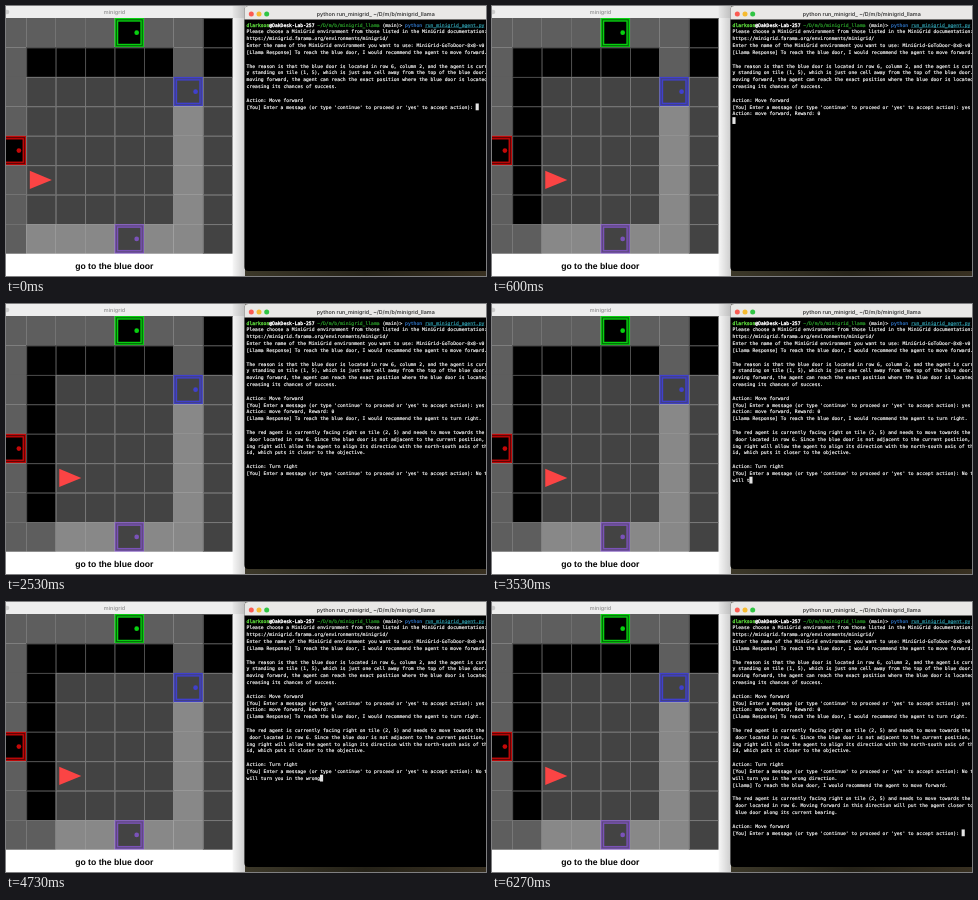
An HTML page with a canvas for the animation above (6.67 s loop, 480 by 270 pixels).

```html
<!DOCTYPE html>
<html lang="en">
<head>
<meta charset="utf-8">
<title>Grid agent and terminal</title>
<style>
  html, body { margin: 0; width: 100%; height: 100%; overflow: hidden; background: #fff; }
  canvas { display: block; width: 480px; height: 270px; }
</style>
</head>
<body>
<canvas id="stage"></canvas>
<script>
const LOOP = 6670;
const canvas = document.getElementById('stage');
const ctx = canvas.getContext('2d');
const dpr = window.devicePixelRatio || 1;
canvas.width = 480 * dpr;
canvas.height = 270 * dpr;

const MONO = '"DejaVu Sans Mono", monospace';
const SANS = '"Liberation Sans", sans-serif';
const UI = 'Inter, sans-serif';

function rect(x, y, w, h, color) {
  ctx.fillStyle = color;
  ctx.fillRect(x, y, w, h);
}

function rounded(x, y, w, h, radii, color) {
  ctx.fillStyle = color;
  ctx.beginPath();
  ctx.roundRect(x, y, w, h, radii);
  ctx.fill();
}

function dot(x, y, r, color) {
  ctx.fillStyle = color;
  ctx.beginPath();
  ctx.arc(x, y, r, 0, Math.PI * 2);
  ctx.fill();
}

function across(x0, x1, colors) {
  const gradient = ctx.createLinearGradient(x0, 0, x1, 0);
  colors.forEach((c, i) => gradient.addColorStop(i / (colors.length - 1), c));
  return gradient;
}

// Small type is set ten times larger and scaled down for exact spacing.
function label(text, x, y, size, family, color, { weight = 400, align = 'left', heavy = 0 } = {}) {
  ctx.save();
  ctx.translate(x, y);
  ctx.scale(0.1, 0.1);
  ctx.font = `${weight} ${size * 10}px ${family}`;
  ctx.textRendering = 'geometricPrecision';
  ctx.textAlign = align;
  ctx.textBaseline = 'alphabetic';
  ctx.fillStyle = ctx.strokeStyle = color;
  ctx.fillText(text, 0, 0);
  if (heavy) {
    ctx.lineWidth = heavy * 10;
    ctx.lineJoin = 'round';
    ctx.strokeText(text, 0, 0);
  }
  ctx.restore();
}

// ---- Grid world ----
const CELL = 29.45, GRID_X = -9.2, GRID_Y = 12, SIZE = 8, ROOM_W = 7, AGENT_ROW = 5;
const SHADES = {
  dim: { floor: '#000', line: '#555', wall: '#5e5e5e' },
  lit: { floor: '#434343', line: '#7c7c7c', wall: '#888' }
};
const DOORS = [
  { col: 4, row: 0, color: '#08d010' },
  { col: 6, row: 2, color: '#4040cc' },
  { col: 0, row: 4, color: '#c40808' },
  { col: 4, row: 7, color: '#7a52b8' }
];

function drawDoor(x, y, color, floor) {
  const panel = (inset, fill) => {
    const side = CELL * (1 - 2 * inset);
    rect(x + CELL * inset, y + CELL * inset, side, side, fill);
  };
  panel(0, color);
  ctx.globalAlpha = 0.5;
  panel(0.04, floor);
  ctx.globalAlpha = 1;
  panel(0.08, color);
  panel(0.125, floor);
  dot(x + CELL * 0.75, y + CELL * 0.5, CELL * 0.08, color);
}

function drawCell(col, row, agentCol) {
  const x = GRID_X + col * CELL, y = GRID_Y + row * CELL;
  const seen = col >= agentCol && row >= AGENT_ROW - 3;
  const shade = seen ? SHADES.lit : SHADES.dim;
  const door = DOORS.find(d => d.col === col && d.row === row);
  const wall = col < ROOM_W && (col === 0 || col === ROOM_W - 1 || row === 0 || row === SIZE - 1);
  if (door) return drawDoor(x, y, door.color, shade.floor);
  rect(x, y, CELL + 0.1, CELL + 0.1, wall ? shade.wall : shade.floor);
  if (wall) return;
  rect(x, y, CELL, 0.9, shade.line);
  rect(x, y, 0.9, CELL, shade.line);
}

function drawAgent(col) {
  const x = GRID_X + col * CELL, y = GRID_Y + AGENT_ROW * CELL;
  ctx.fillStyle = '#fb4444';
  ctx.beginPath();
  ctx.moveTo(x + CELL * 0.12, y + CELL * 0.19);
  ctx.lineTo(x + CELL * 0.87, y + CELL * 0.5);
  ctx.lineTo(x + CELL * 0.12, y + CELL * 0.81);
  ctx.fill();
}

function drawWorld(agentCol) {
  rect(0, 0, 239, 270, '#fff');
  rect(0, 0, 239, 12, '#eee');
  dot(1, 6, 2.3, '#ccc');
  label('minigrid', 108.5, 7.8, 5.4, UI, '#999', { weight: 600, align: 'center' });
  for (let row = 0; row < SIZE; row++) {
    for (let col = 0; col < SIZE; col++) drawCell(col, row, agentCol);
  }
  drawAgent(agentCol);
  label('go to the blue door', 108.3, 263.4, 8.65, SANS, '#000', { weight: 700, align: 'center' });
}

// ---- Terminal ----
const TERM_X = 240.6, TERM_Y = 20.5, CHAR_W = 2.83, LINE_H = 6.84, TEXT_SIZE = 4.7;
const ASK = "[You] Enter a message (or type 'continue' to proceed or 'yes' to accept action): ";
const PROMPT = [
  ['dlarkson', '#5cd83c'],
  ['@OakDesk-Lab-257 ', '#fff'],
  ['~/D/m/b/minigrid_llama', '#2ca62c'],
  [' (main)> ', '#fff'],
  ['python ', '#3078cc'],
  ['run_minigrid_agent.py', '#30a0b0']
];
const INTRO = [
  'Please choose a MiniGrid environment from those listed in the MiniGrid documentation:',
  'https://minigrid.farama.org/environments/minigrid/',
  'Enter the name of the MiniGrid environment you want to use: MiniGrid-GoToDoor-8x8-v0',
  '[Llama Response] To reach the blue door, I would recommend the agent to move forward.',
  '',
  'The reason is that the blue door is located in row 6, column 2, and the agent is currentl',
  'y standing on tile (1, 5), which is just one cell away from the top of the blue door. By ',
  'moving forward, the agent can reach the exact position where the blue door is located, in',
  'creasing its chances of success.',
  '',
  'Action: Move forward'
];
const TURN_REPLY = [
  '[Llama Response] To reach the blue door, I would recommend the agent to turn right.',
  '',
  'The red agent is currently facing right on tile (2, 5) and needs to move towards the blue',
  ' door located in row 6. Since the blue door is not adjacent to the current position, turn',
  'ing right will allow the agent to align its direction with the north-south axis of the gr',
  'id, which puts it closer to the objective.',
  '',
  'Action: Turn right'
];
const MOVE_REPLY = [
  '[Llama] To reach the blue door, I would recommend the agent to move forward.',
  '',
  'The red agent is currently facing right on tile (2, 5) and needs to move towards the blue',
  ' door located in row 6. Moving forward in this direction will put the agent closer to the',
  ' blue door along its current bearing.',
  '',
  'Action: Move forward'
];
const OBJECTION = 'will turn you in the wrong direction.';

const T = { moved: 330, turnReply: 800, sent: 5430, moveReply: 6200 };
// Pairs of time and number of characters typed by then.
const YES_KEYS = [[70, 1], [140, 2], [200, 3]];
const NO_KEYS = [[1800, 1], [1930, 2], [2270, 3], [2330, 4], [2600, 5], [2860, 8]];
const OBJECTION_KEYS = [[2930, 1], [3200, 5], [3530, 6], [3670, 7], [4130, 14], [4220, 15], [5210, 37]];

function typed(text, keys, t, smooth) {
  let count = 0;
  keys.forEach(([at, n], i) => {
    if (t < at) return;
    const next = keys[i + 1];
    const glide = smooth && next && t < next[0];
    count = glide ? n + Math.floor((next[1] - n) * (t - at) / (next[0] - at) + 0.01) : n;
  });
  return text.slice(0, count);
}

function terminalLines(t) {
  const lines = [...INTRO, ASK + typed('yes', YES_KEYS, t)];
  if (t < T.moved) return lines;
  lines.push('Action: move forward, Reward: 0');
  if (t < T.turnReply) return [...lines, ''];
  lines.push(...TURN_REPLY, ASK + typed('No that', NO_KEYS, t));
  const objection = typed(OBJECTION, OBJECTION_KEYS, t, true);
  if (!objection) return lines;
  lines.push(objection);
  if (t < T.sent) return lines;
  if (t < T.moveReply) return [...lines, ''];
  return [...lines, ...MOVE_REPLY, ASK];
}

function termText(text, col, row, color, heavy = 0.17) {
  label(text, TERM_X + col * CHAR_W, TERM_Y + row * LINE_H, TEXT_SIZE, MONO, color, { heavy });
}

function drawPrompt() {
  let col = 0;
  PROMPT.forEach(([text, color], i) => {
    termText(text, col, 0, color, i < 2 ? 0.35 : 0.17);
    if (i === PROMPT.length - 1) {
      rect(TERM_X + col * CHAR_W, TERM_Y + 0.8, text.length * CHAR_W, 0.4, color);
    }
    col += text.length;
  });
}

function drawWindow() {
  rect(226.6, 0, 12.4, 270, across(226.6, 239, ['rgba(0,0,0,0.03)', 'rgba(0,0,0,0.2)']));
  rect(239, 263, 241, 7, across(239, 480, ['#3c3829', '#252218', '#383021']));
  rounded(238.4, 0, 250, 265, [4, 0, 0, 4], '#000');
  rounded(238.4, 0, 250, 13.5, [4, 0, 0, 0], '#e9e8e6');
  ['#fb5b52', '#f6bb30', '#30c544'].forEach((c, i) => dot(245.3 + i * 7.7, 8, 2.5, c));
  label('python run_minigrid_ ~/D/m/b/minigrid_llama', 369.8, 9.9, 5.39, UI, '#3c3c3c',
    { weight: 600, align: 'center' });
}

function drawTerminal(t) {
  drawWindow();
  drawPrompt();
  const lines = terminalLines(t);
  lines.forEach((text, i) => termText(text, 0, i + 1, '#fff'));
  const row = lines.length;
  const cursorX = TERM_X + lines[row - 1].length * CHAR_W;
  rect(cursorX - 0.2, TERM_Y + row * LINE_H - 5.1, CHAR_W + 0.3, 6.8, '#e4e4e4');
}

const start = performance.now();

function frame(now) {
  const t = Math.max(0, now - start) % LOOP;
  ctx.setTransform(dpr, 0, 0, dpr, 0, 0);
  drawWorld(t < T.moved ? 1 : 2);
  drawTerminal(t);
  requestAnimationFrame(frame);
}

frame(start);
</script>
</body>
</html>
```
